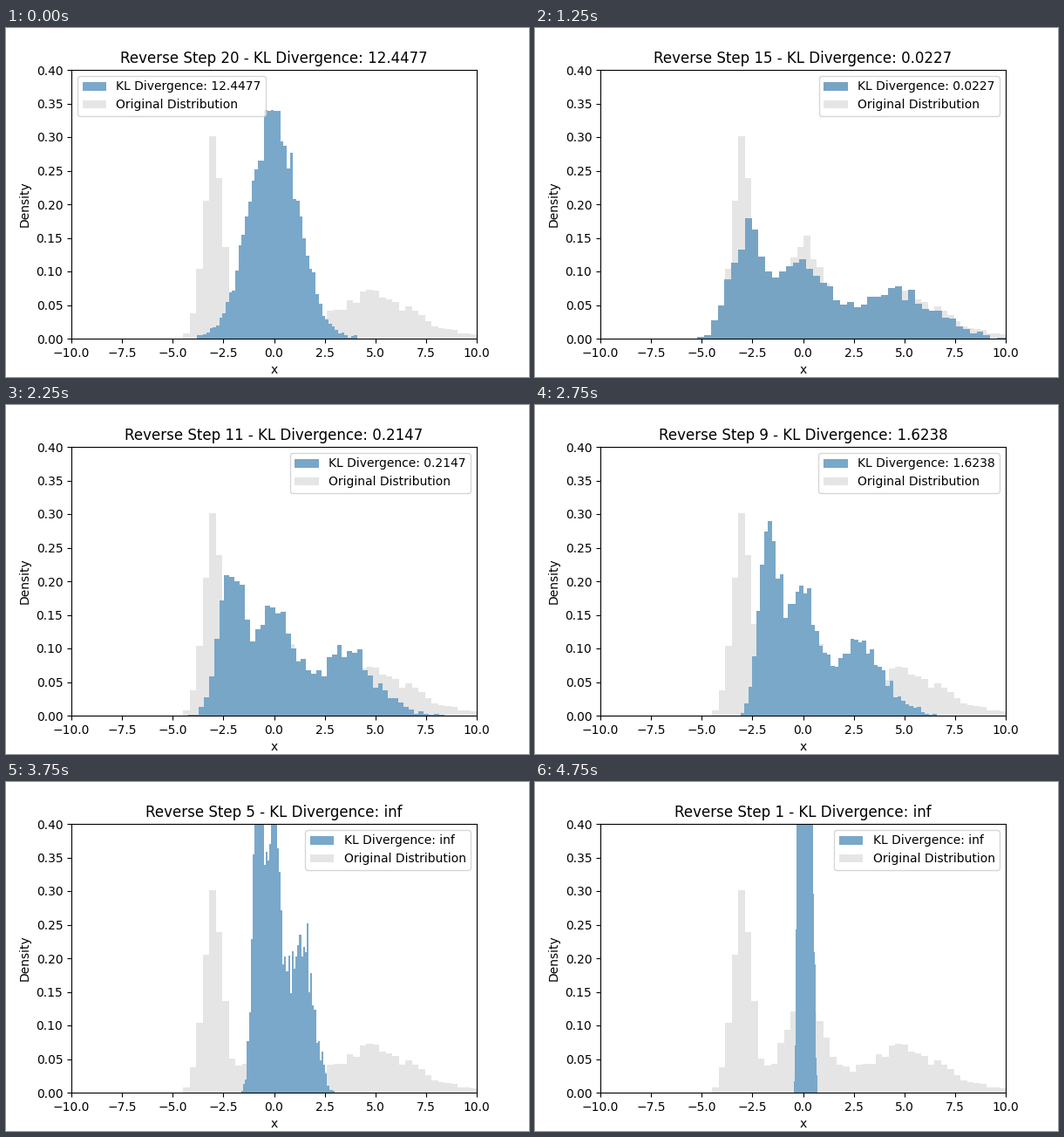
A matplotlib script that plays this animation: 600 px wide and 400 px high, repeating every 5 s.

```python
import numpy as np
import matplotlib.pyplot as plt
from matplotlib.animation import FuncAnimation

STEPS = 20
BINS = 50
SAMPLES = 5000
GREY = "#e5e5e5"
LIGHT_BLUE = np.array([121, 168, 202]) / 255
DEEP_BLUE = np.array([120, 164, 196]) / 255

# Three equal normal components
MEANS = np.array([-3, 0, 5])
BASE_SDS = np.array([0.5, 1, 2])
MODEL_SDS = np.array([0.88, 1.25, 2.12])
BASE_LOW, BASE_HIGH = -4.486, 11.644

# The model is the same mixture shrinking towards 0, blurred by added noise
KEYS = [1, 5, 7, 9, 13, 17, 19, 20]
LOW = [-0.45, -1.61, -2.43, -3.08, -5.36, -6.43, -4.8, -3.81]
HIGH = [0.7, 2.99, 4.71, 6.6, 10.2, 11.63, 9.5, 4.11]
SCALE = [0.062, 0.265, 0.4, 0.56, 0.83, 1, 0.8, 0]
NOISE = [0.06, 0.06, 0.06, 0.06, 0.06, 0.06, 0.5, 1.2]

# Divergence moves exponentially between these points
KL_STEPS = [6, 7, 9, 13, 17, 20]
KL_VALUES = [14.2641, 8.4276, 1.6238, 0.0284, 0.0181, 12.4477]


def divergence(step):
    if step < KL_STEPS[0]:
        return np.inf
    return np.exp(np.interp(step, KL_STEPS, np.log(KL_VALUES)))


def mixture(x, means, sds):
    z = (x[:, None] - means) / sds
    return np.mean(np.exp(-z * z / 2) / (sds * np.sqrt(2 * np.pi)), axis=1)


def histogram(low, high, means, sds, seed):
    width = (high - low) / BINS
    left = low + width * np.arange(BINS)
    expected = SAMPLES * width * mixture(left + width / 2, means, sds)
    counts = np.random.RandomState(seed).poisson(expected)
    counts[[0, -1]] = np.maximum(counts[[0, -1]], 1)
    return left, counts / (SAMPLES * width), width


def model(step):
    low, high, scale, noise = (
        np.interp(step, KEYS, row) for row in (LOW, HIGH, SCALE, NOISE))
    sds = np.hypot(scale * MODEL_SDS, noise)
    return histogram(low, high, scale * MEANS, sds, step)


def blue(left, heights, width):
    """Deepen the blue as more of the model covers the base."""
    base = mixture(left + width / 2, MEANS, BASE_SDS)
    overlap = np.sum(np.minimum(heights, base)) * width
    mix = np.interp(overlap, [0.5, 0.85], [0, 1])
    return tuple(LIGHT_BLUE + (DEEP_BLUE - LIGHT_BLUE) * mix)


fig, ax = plt.subplots(figsize=(6, 4), dpi=100)


def bars(data, color):
    left, heights, width = data
    return ax.bar(left, heights, width, align="edge", color=color, linewidth=0)


def draw(frame):
    step = STEPS - frame
    label = f"KL Divergence: {divergence(step):.4f}"
    ax.clear()
    base = bars(histogram(BASE_LOW, BASE_HIGH, MEANS, BASE_SDS, 0), GREY)
    data = model(step)
    current = bars(data, blue(*data))
    ax.set_xlim(-10, 10)
    ax.set_ylim(0, 0.4)
    ax.set_title(f"Reverse Step {step} - {label}")
    ax.set_xlabel("x")
    ax.set_ylabel("Density")
    ax.legend([current, base], [label, "Original Distribution"],
              loc="upper left" if step == STEPS else "upper right")
    return []


anim = FuncAnimation(fig, draw, frames=STEPS, interval=250, repeat=True)
plt.show()
```
